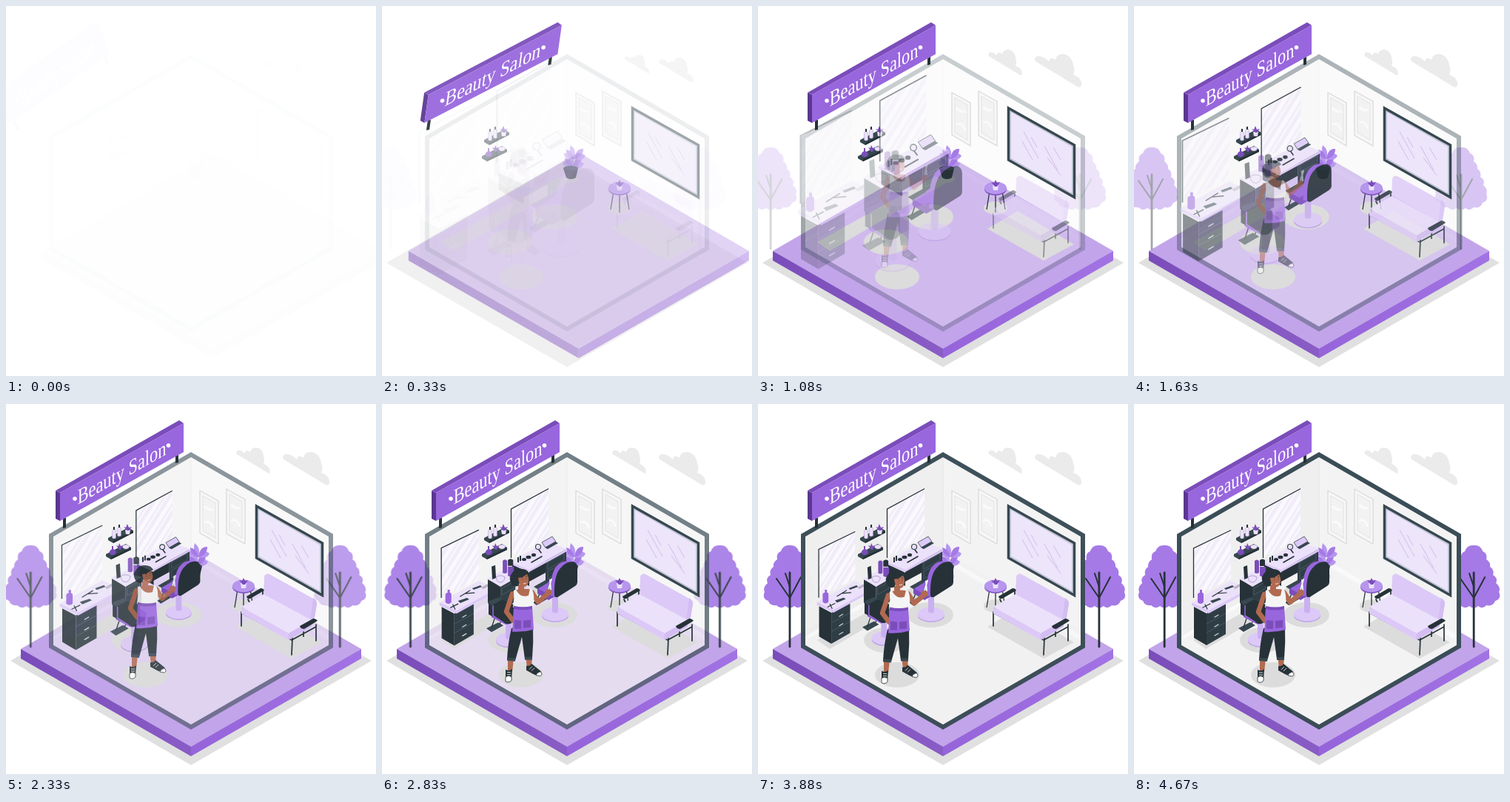
An HTML page that plays this animation: 500 px wide and 500 px high, repeating every 4710 ms.

```html
<!DOCTYPE html>
<html lang="en">
<head>
<meta charset="utf-8">
<title>Beauty Salon</title>
<style>
  html, body { margin: 0; width: 100%; height: 100%; overflow: hidden; background: #fff; }
  svg { display: block; width: 100vw; height: 100vh; }
  .ink { fill: #263238; } .slate { fill: #37474f; } .line { fill: none; stroke: #263238; }
  .main { fill: #9866dd; } .deep { fill: #7a4dba; } .lilac { fill: #b796ee; }
  .pale { fill: #dcc9f7; } .mist { fill: #ebe1fa; } .skin { fill: #b16a50; } .grey { fill: #dcdcdc; }
  .cap { stroke-linecap: round; stroke-linejoin: round; }
</style>
</head>
<body>
<svg viewBox="0 0 500 500">
  <defs>
    <pattern id="shine" width="15" height="15" patternUnits="userSpaceOnUse" patternTransform="rotate(32)">
      <path fill="#f1edf8" d="M0 0H15V15H0z"/><path fill="#fbf9fe" d="M0 0H5V15H0zM8 0H10V15H8z"/>
    </pattern>
    <linearGradient id="left"><stop stop-color="#7a4dba"/><stop offset="1" stop-color="#8a5cc6"/></linearGradient>
    <linearGradient id="right"><stop stop-color="#9664da"/><stop offset="1" stop-color="#a273e4"/></linearGradient>
    <g id="tree">
      <path fill="#a57ae6" d="M0 191q9-1 12 8q7 3 5 11q6 4 5 10q6 4 4 11q7 4 4 11q7 6 4 12q4 9-5 12q-3 8-12 6q-5 6-11 1q-6 5-12 0q-7 5-12-1q-9 1-11-6q-9-3-5-12q-3-6 4-12q-3-7 4-11q-2-7 4-11q-1-6 5-10q-2-8 5-11q3-9 12-8z"/>
      <g class="line cap" stroke-width="2"><path stroke-width="2.800" d="M0 328V228"/><path d="M0 262L-18 236M0 262L15 234M0 247L-6 229"/></g>
    </g>
    <g id="leaves">
      <path class="lilac" d="M0 0q-9-8-5-19q9 7 5 19zM0 0q-14 1-14-8q11-2 14 8zM0 0q12 3 15-5q-9-8-15 5z"/>
      <path fill="#a57ae6" d="M0 0q-12-4-11-13q9 2 11 13zM0 0q2-15 12-14q0 11-12 14z"/>
    </g>
    <g id="bottle"><path d="M-2.500 0V-9q0-2 1.500-2V-13H1V-11q1.500 0 1.500 2V0q-2.500 2-5 0z"/></g>
  </defs>

  <path id="ground" fill="#e0e0e0" d="M6 347L250 206L494 347L250 488z"/>
  <g id="base">
    <path fill="#c2a4ea" d="M20 331L250 198L480 331L250 463z"/>
    <path fill="url(#left)" d="M20 331L250 463V476L20 344z"/>
    <path fill="url(#right)" d="M480 331L250 463V476L480 344z"/>
  </g>
  <g id="clouds" fill="#ebebeb">
    <path d="M312 64C315 61 320 63 322 67C323 62 328 62 330 65C332 56 347 57 348 70Q350 76 348 81Q357 84 357 92Q356 95 352 92L314 69Q310 67 312 64z"/>
    <path d="M375 69C381 66 389 70 393 75C394 69 399 70 402 73C404 60 424 62 426 80Q429 86 426 93Q438 97 437 107Q436 112 430 108L377 76Q372 73 375 69z"/>
  </g>
  <g id="trees"><use href="#tree" x="41"/><use href="#tree" x="459"/></g>

  <g id="room">
    <path fill="#f3f3f3" d="M61 177.500L250 68.500L439 177.500V327.500L250 436.500L61 327.500z"/>
    <path fill="#efefef" d="M61 177.500L250 68.500V212L61 321z"/>
    <path fill="#fafafa" d="M250 205L439 314V321L250 212L61 321V316z"/>
    <path fill="none" stroke="#e4e4e4" d="M250 70V206"/>
    <path fill="none" stroke="#3b4d57" stroke-width="6" d="M61 177.500L250 68.500L439 177.500V327.500L250 436.500L61 327.500z"/>
  </g>

  <g id="shadows" class="grey">
    <ellipse cx="173" cy="319" rx="30" ry="17"/><ellipse cx="188" cy="366" rx="30" ry="17"/>
    <ellipse cx="233" cy="285" rx="31" ry="17"/><ellipse cx="256" cy="233" rx="10" ry="6"/>
    <ellipse cx="321" cy="273" rx="16" ry="9"/>
    <path d="M310 301L351 277L427 322L386 344zM80 319L240 230L254 239L97 331z"/>
  </g>

  <g id="decor">
    <g fill="#f7f7f7" stroke="#dcdcdc" stroke-width="1.400">
      <path d="M262 117L287 131V189L262 174zM298 115L323 129V189L298 175z"/>
      <path fill="#f2f2f2" stroke="#e8e8e8" d="M266 124L283 134V181L266 171zM302 122L319 132V181L302 171z"/>
      <path fill="none" stroke="#fafafa" stroke-width="3" d="M268 138q8 7 13 4M268 160q8-4 12 8M304 136q8 7 13 4M304 158q8-4 12 8"/>
    </g>
    <path fill="#ede5fa" stroke="#37474f" stroke-width="3.500" d="M338.500 138L427.500 188V258.500L338.500 208z"/>
    <path fill="none" stroke="#78909c" stroke-width=".6" d="M341 142L425 190V254L341 206z"/>
    <path fill="none" stroke="#c9b3e8" stroke-width=".8" d="M357 183L371 208M359 170L379 206M369 177L377 191M387 189L405 222M391 205L409 229M399 191L409 208"/>

    <path class="slate" d="M138 181L165 167L172 171V174L145 188L138 184zM135 203L162 189L169 194V197L142 210L135 206z"/>
    <path class="ink" d="M145 185L172 171V174L145 188zM142 207L169 194V197L142 210z"/>
    <g class="mist" stroke="#9a86b8" stroke-width=".4">
      <use href="#bottle" x="146" y="181"/><use href="#bottle" x="153" y="178"/>
      <path d="M161 170h7l-1 6h-5zM157 192q6-4 10 0q-1 4-5 4t-5-4z"/>
    </g>
    <path class="ink" d="M145 166h2v4h-2zM152 163h2v4h-2z"/>
    <path class="deep" d="M140 199q4-6 9 0q0 5-5 5t-4-5zM143 192h2v5h-2zM164 171l-5-5 3 1 2-5 2 5 4-1-4 5zM153 197l-4-6 3 1 1-4 2 4 3-1-3 6z"/>

    <use href="#leaves" x="258" y="218"/><use href="#leaves" x="260" y="207"/>
    <path class="ink" d="M245 219q10-5 20 0l-3 13q-7 4-13 0z"/><ellipse class="slate" cx="255" cy="219" rx="10" ry="3"/>

    <path class="line" stroke-width="1.300" d="M313 250L309 275M330 250L334 275M321 253V279"/>
    <ellipse class="deep" cx="321" cy="247.500" rx="15" ry="8.500"/><ellipse class="lilac" cx="321" cy="246" rx="15" ry="8.500"/>
    <path class="mist" d="M317 242h8l-1 7h-6z"/>
    <path class="deep" d="M320 244l-5-6 4 1 2-4 2 4 4-1-4 6z"/>
  </g>

  <g id="station2">
    <path fill="url(#shine)" d="M174 142L225 114V181L174 208z"/>
    <path class="line" stroke-width="1.300" d="M174.500 208V142L225 114.500"/>
    <path class="ink" d="M176 217L199 228V246L176 233zM199 225L221 212V228L199 240z"/>
    <path fill="#2f3d45" d="M221 211L249 196V232L221 247z"/>
    <path fill="none" stroke="#52656f" stroke-width=".7" d="M224 214L246 202V211L224 223zM224 226L246 214V224L224 236z"/>
    <path class="mist" d="M173 213L224 186L250 196L199 224z"/><path class="pale" d="M173 213L199 224V227L173 216zM199 224L250 196V199L199 227z"/>
    <path class="pale" stroke="#37474f" stroke-width=".8" d="M216 187L230 179L235 186L221 194z"/><path class="slate" d="M220 194L234 186L238 188L224 196z"/>
    <g class="ink"><ellipse cx="192" cy="210" rx="3" ry="2"/><ellipse cx="198" cy="207" rx="3.500" ry="2.300"/><ellipse cx="205" cy="204" rx="3" ry="2.300"/>
      <path d="M183 207h2v7h-2zM186 205h2v7h-2z"/></g>
    <circle class="mist" cx="211" cy="193" r="3.500" stroke="#37474f" stroke-width="1.200"/>
    <path class="line cap" stroke-width="1.600" d="M212 197l3 4M202 214L216 206"/>

    <ellipse cx="234" cy="286" rx="18" ry="9" fill="#bfa1e8"/><ellipse class="pale" cx="234" cy="284" rx="18" ry="9.500"/>
    <path fill="#c9b0ef" d="M230 258h8v23q-4 3-8 0z"/>
    <path class="slate" d="M204 268L219 260L224 263L209 272z"/>
    <path class="line" stroke-width="1.300" d="M209 267L215 250M219 262L226 252"/>
    <path class="deep" d="M210 249L230 237L244 246V254L225 265L210 256z"/><path class="main" d="M210 249L230 237L242 244L223 256z"/>
    <path class="main" d="M228 259q-1-30 8-40 6-7 16-7l-14 49z"/>
    <path class="ink" d="M233 259q-1-27 8-37 7-9 17-9 6 1 6 8v20q0 3-3 5l-22 14q-5 3-6-1z"/>
    <path class="slate" d="M205 247L221 238L225 241L210 250z"/>
  </g>

  <g id="station1">
    <path fill="url(#shine)" d="M80 195L131 170V236L80 262z"/>
    <path class="line" stroke-width="1.300" d="M80.500 262V195L131 170.500"/>
    <path class="ink" d="M81 274L98 283V326L81 316z"/><path fill="#2f3d45" d="M98 283L124 269V311L98 326z"/>
    <path fill="none" stroke="#52656f" stroke-width=".7" d="M98 297L124 283M98 309L124 295"/>
    <path class="cap" fill="none" stroke="#cfd8dc" stroke-width="1.200" d="M109 288l5-3M109 301l5-3M109 313l5-3"/>
    <path class="mist" d="M78 268L131 239L154 250L101 279z"/><path class="pale" d="M78 268L101 279V283L78 272zM101 279L154 250V254L101 283z"/>
    <path class="main" d="M86 268V257q1-2 3-2v-4h3v4q2 0 2 2v11q-4 4-8 0z"/>
    <path class="slate" d="M103 266l12-4 3 2-12 5zM122 249l11-4 2 2-11 4z"/>
    <path fill="#b9b4c4" d="M134 248l9-5 3 2-9 5z"/>
    <path class="line cap" stroke-width="1.200" d="M93 275l10-5M96 271l3 6M106 260l13-8M113 256l12-1"/>

    <path class="ink" d="M143 237L160 246V279L143 269z"/><path fill="#2f3d45" d="M160 246L180 235V267L160 279z"/>
    <path class="mist" d="M142 236L161 226L181 235L160 247z"/>
    <path fill="none" stroke="#52656f" stroke-width=".7" d="M162 249L178 240V249L162 258z"/>
    <path class="ink" d="M148 220l5-2 1 17-5 2zM170 211q4-3 7 0v8h-7z"/>
    <path class="deep" d="M163 212q3-3 6 0v16q-3 2-6 0zM170 220h8v12q-4 3-8 0z"/>
    <path class="mist" stroke="#9a86b8" stroke-width=".7" d="M154 234q6-4 12 0q-1 7-6 7t-6-7z"/>

    <ellipse cx="171" cy="320" rx="17" ry="9" fill="#bfa1e8"/><ellipse class="pale" cx="171" cy="318" rx="17" ry="9.500"/>
    <path fill="#c9b0ef" d="M167 290h8v26q-4 3-8 0z"/>
    <path class="slate" d="M141 303L157 295L164 299L148 308z"/>
    <path class="line" stroke-width="1.300" d="M148 302L155 281M159 297L165 283"/>
    <path class="main" d="M148 281L168 268L186 279V288L167 298L148 288z"/>
    <path class="ink" d="M144 264q8-4 14-1l20 8v21q-3 6-10 5l-24-13z"/>
    <path class="slate" d="M143 267l15-6 5 3-15 8z"/>
    <path class="line" stroke-width="1.500" d="M150 272v14l14 9" style="stroke:#9866dd"/>
  </g>

  <g id="sofa">
    <path class="line cap" stroke-width="1.700" d="M318 281V300M387 316L386 339M419 298V320M327 264L332 274M347 253v8M402 303v11M318 282L386 319L419 301"/>
    <path class="pale" d="M349 234q1-6 7-4l61 34q4 2 3 7l-4 24L348 260z"/>
    <path fill="#d3bdf3" d="M411 293L415 262q5 3 5 8l-4 24z"/>
    <path class="mist" d="M318 274L348 257L413 292L382 310z"/>
    <path class="pale" d="M318 274L382 310V319L318 283z"/><path fill="#d3bdf3" d="M382 310L413 292V301L382 319z"/>
    <path class="ink" d="M325 260L344 249q4 0 5 3L330 263q-4 1-5-3zM397 300L415 290q4 0 6 3L403 304q-5 0-6-4z"/>
  </g>

  <g id="person">
    <path class="skin" d="M170 345h8l-2 17h-6zM194 341h9l-1 15h-6z"/>
    <path class="ink" d="M175 303L204 301Q205 322 203 344L193 345L189 315L180 347L169 346Q170 324 175 303z"/>
    <path class="slate" d="M169 343l11 1v4l-11-1zM193 342h10v4h-10z"/>
    <path class="ink" d="M167 359q5 3 9-1l-1 15q-3 4-8 1zM195 354q5 1 7-3l11 9q3 2 2 5-6 3-11 0l-9-5z"/>
    <path fill="#fff" stroke="#263238" stroke-width=".8" d="M167 369q4-3 8 0v5q-4 4-8 1zM208 367q1-4 6-5 4 4 0 6z"/>
    <path fill="none" stroke="#fff" stroke-width=".8" d="M169 363h5M169 366h5M199 359l4-4M202 361l4-4"/>
    <path fill="none" stroke="#b16a50" stroke-width="6.500" class="cap" d="M176 257L168 281L177 293M203 255L211 268L225 256"/>
    <path class="skin" d="M176 254q10-6 26-3l3 10h-30zM184 244h8v10h-8z"/>
    <path fill="#f5f5f5" d="M178 252l3-1q6 12 17 8l2-9 3 1q4 9 1 24h-27q2-12 1-23z"/>
    <path class="main" d="M178 274q13 3 25 0l2 31q-14 4-29 3z"/><path class="deep" d="M178 273q13 3 25 0v4q-13 3-25 0zM179 292l9 1v11h-9zM191 293l10-1v10l-10 1z"/>
    <path class="ink" d="M174 241q-3-6 1-11 5-8 13-7 8 0 11 6l-9 5-6 12q-7 3-10-5z"/>
    <path class="skin" d="M184 235q6 0 12-5 4 8 1 14-3 5-8 3-4-3-5-12z"/>
    <path fill="none" stroke="#263238" stroke-width=".8" d="M188 235l3-1M194 234l2-1M190 237v1M195 236v1"/>
    <path fill="none" stroke="#fff" stroke-width=".8" d="M191 243q2 1 4-1"/>
    <path class="cap" fill="none" stroke="#90a4ae" stroke-width="2.400" d="M225 251L229 237M228 251L227 238"/>
    <path class="cap" fill="none" stroke="#fff" stroke-width="1.500" d="M225 251L229 237M228 251L227 238"/>
    <circle class="skin" cx="225" cy="255" r="4.500"/>
  </g>

  <g id="sign">
    <path class="ink" d="M77 154h4v13l-4 1zM229 66h4v13l-4 1z"/>
    <path fill="#5b3791" d="M67 117L73 120V158L67 155z"/><path fill="#7a4dba" d="M67 117L234 22L240 26L73 120z"/>
    <path fill="#9866dd" d="M73 120L240 26V65L73 158z"/>
    <g fill="#fff"><circle cx="93" cy="128" r="2.800"/><circle cx="219.500" cy="56" r="2.800"/>
      <text transform="matrix(.77 -.436 0 1 156.500 102)" text-anchor="middle" font-size="29" font-family="'Liberation Serif', serif">Beauty Salon</text></g>
  </g>
</svg>
<script>
const LOOP = 4710, LEAD = 40;
const el = id => document.getElementById(id);
const mix = (a, b, k) => a + (b - a) * k;

// cubic-bezier(.36, -.01, .5, 1.38)
function ease(x) {
  if (x >= 1) return 1;
  const curve = (s, a, b) => 3 * s * (1 - s) ** 2 * a + 3 * s * s * (1 - s) * b + s ** 3;
  let lo = 0, hi = 1;
  for (let i = 0; i < 24; i++) {
    const mid = (lo + hi) / 2;
    if (curve(mid, .36, .5) < x) lo = mid; else hi = mid;
  }
  return curve(lo, -.01, 1.38);
}

function pose(id, opacity, transform = '') {
  el(id).setAttribute('opacity', Math.max(0, Math.min(1, opacity)));
  el(id).setAttribute('transform', transform);
}
const slide = (id, k, dx, dy) => pose(id, k, `translate(${dx * (1 - k)} ${dy * (1 - k)})`);
const zoom = (id, k, from, x, y) => {
  const s = mix(from, 1, k);
  pose(id, k, `translate(${x * (1 - s)} ${y * (1 - s)}) scale(${s})`);
};

function swoosh(id, p, x, y) {
  const stops = [[0, 20], [.6, -10], [.8, 2], [1, 0]];
  const i = p < .6 ? 0 : p < .8 ? 1 : 2;
  const [[p0, a0], [p1, a1]] = [stops[i], stops[i + 1]];
  const k = ease((p - p0) / (p1 - p0));
  const shift = i ? 0 : -92 * (1 - k);
  pose(id, i ? 1 : k, `translate(${x + shift} ${y}) skewX(${mix(a0, a1, k)}) translate(${-x} ${-y})`);
}

function draw(now) {
  const t = now % LOOP + LEAD;
  const quick = ease(t / 1000), slow = ease(t / 4300), mid = ease(t / 2870);
  pose('ground', quick);
  slide('base', quick, 30, 0);
  zoom('clouds', quick, .5, 374, 84);
  slide('trees', ease(t / 4750), -30, 0);
  pose('room', t / 4000);
  pose('shadows', quick);
  pose('decor', quick);
  zoom('station2', mid, 1.5, 215, 200);
  zoom('station1', slow, 1.5, 142, 248);
  pose('sofa', ease(t / 3100));
  slide('person', slow, 0, -30);
  swoosh('sign', Math.min(1, t / 1000), 153, 90);
}

const start = performance.now();
function tick() {
  draw(performance.now() - start);
  requestAnimationFrame(tick);
}
tick();
</script>
</body>
</html>
```
